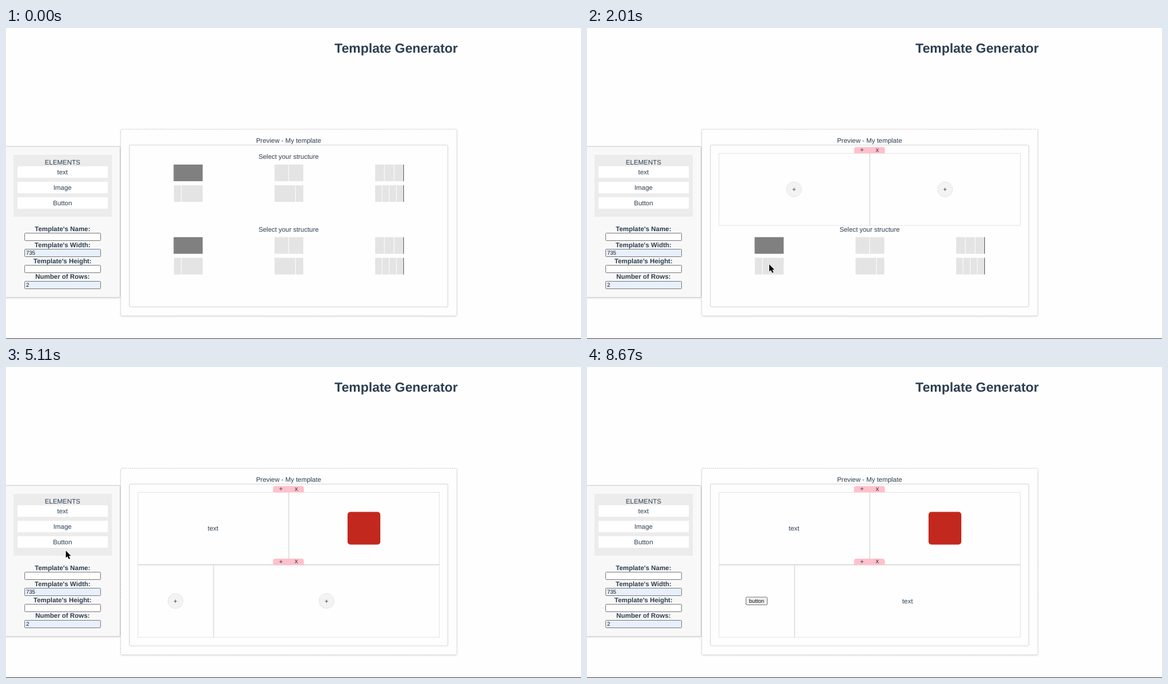
These frames come from a looping animation (1000 px wide and 542 px high, 8.77 s). An HTML page:

```html
<!DOCTYPE html>
<html lang="en">
<head>
<meta charset="utf-8">
<title>Template Generator</title>
<style>
  html, body { margin: 0; width: 100%; height: 100%; overflow: hidden; background: #fefefe; }
  svg { display: block; width: 1000px; height: 542px; overflow: hidden; }
  text {
    font: 11.43px "Liberation Sans", Arial, sans-serif;
    fill: #2c3e50; text-anchor: middle; text-rendering: geometricPrecision;
  }
  .title { font-size: 22.86px; font-weight: bold; }
  .label { font-weight: bold; }
  .control { font-size: 9.52px; fill: #111; }
  .left { text-anchor: start; }
  .input { fill: #fff; stroke: #767676; }
  .filled { fill: #e8f0fe; }
  .white { fill: #fff; }
  .panel { stroke: #ccc; filter: drop-shadow(0 1px 1.5px #0002); }
  .cell { fill: #fefefe; stroke: #e3e3e3; }
  .divider { stroke: #dcdcdc; stroke-width: 1.6; }
  .block { fill: #e4e4e4; }
  .edge { fill: #555; }

  /* Parts that appear at a set moment of the loop */
  .step { animation: 8.77s step-end infinite; }
  .row1 { animation-name: row1; }
  .row2 { animation-name: row2; }
  .text1 { animation-name: text1; }
  .image { animation-name: image; }
  .button { animation-name: button; }
  .text2 { animation-name: text2; }
  @keyframes row1 { 0% { visibility: hidden } 11.52%, 100% { visibility: visible } }
  @keyframes row2 { 0% { visibility: hidden } 24.52%, 100% { visibility: visible } }
  @keyframes text1 { 0% { visibility: hidden } 35.8%, 100% { visibility: visible } }
  @keyframes image { 0% { visibility: hidden } 52.68%, 100% { visibility: visible } }
  @keyframes button { 0% { visibility: hidden } 69.1%, 100% { visibility: visible } }
  @keyframes text2 { 0% { visibility: hidden } 87%, 100% { visibility: visible } }

  .cursor { animation: travel 8.77s linear infinite; }
  @keyframes travel {
    0%, 2.16% { transform: translate(440px, 550px) }
    /* pick both row structures */
    9.92%, 14.02% { transform: translate(484px, 250px) }
    14.6%, 15.5% { transform: translate(480px, 252px) }
    21.9%, 25% { transform: translate(317px, 412px) }
    /* drag text */
    28.4%, 29.7% { transform: translate(127px, 272px) }
    31%, 32% { transform: translate(112px, 249px) }
    33.87%, 35.9% { transform: translate(360px, 281px) }
    41.5%, 42.8% { transform: translate(131px, 253px) }
    /* drag image */
    44.13%, 46.4% { transform: translate(116px, 277px) }
    47.55%, 52.7% { transform: translate(622px, 281px) }
    58.2%, 59.3% { transform: translate(104px, 320px) }
    /* drag button */
    61.35%, 62.7% { transform: translate(112px, 304px) }
    65.91%, 69.1% { transform: translate(295px, 407px) }
    71.4%, 72.15% { transform: translate(146px, 314px) }
    72.3%, 73.88% { transform: translate(140px, 306px) }
    /* drag second text */
    78.68%, 80.26% { transform: translate(110px, 250px) }
    81.41%, 88% { transform: translate(557px, 407px) }
    96.58%, 100% { transform: translate(520px, 550px) }
  }
</style>
</head>
<body>
<svg viewBox="0 0 1000 542">
  <defs>
    <g id="picker">
      <text x="491.5" y="228.3">Select your structure</text>
      <path fill="#808080" d="M291.5 238h50.5v29h-50.5z"/>
      <path class="block" d="M467 238h24v29h-24zM492 238h25v29h-25z
        M642 238h15.5v29h-15.5zM658.5 238h16v29h-16zM675.5 238h15.5v29h-15.5z
        M292 274h12.5v29h-12.5zM305.5 274h36.5v29h-36.5z
        M467 274h36v29h-36zM504 274h13v29h-13z
        M642 274h11.5v29h-11.5zM654.5 274h11.5v29h-11.5zM667 274h11.5v29h-11.5zM679.5 274h11.5v29h-11.5z"/>
      <path class="edge" d="M691 238h1v29h-1zM691 274h1v29h-1z"/>
    </g>
    <g id="add">
      <circle r="13" fill="#f3f3f3" stroke="#ccc" stroke-width=".8" stroke-dasharray="1.4 1"/>
      <text y="3.8">+</text>
    </g>
    <g id="tab">
      <path fill="#ffc0cb" d="M464.5 218.5v-7q0-4 4-4h45.5q4 0 4 4v7z"/>
      <text x="478" y="216.3">+</text>
      <text x="504.8" y="216">x</text>
    </g>
    <g id="word">
      <circle r="14.5" fill="#fefefe"/>
      <text y="3.8">text</text>
    </g>
  </defs>

  <rect width="1000" height="542" fill="#fefefe"/>
  <text class="title" x="678.5" y="43.3">Template Generator</text>

  <rect class="panel" x="-2.5" y="206.5" width="201" height="263" rx="2" fill="#f8f8f8"/>
  <path fill="#ececec" d="M13 221h171v108h-171z"/>
  <path class="white" d="M20 241h157v20h-157zM20 268h157v20h-157zM20 295h157v20h-157z"/>
  <text x="98.3" y="238.3">ELEMENTS</text>
  <text x="98.3" y="254.7">text</text>
  <text x="98.3" y="282">Image</text>
  <text x="98.3" y="309">Button</text>

  <text class="label" x="98.3" y="354">Template's Name:</text>
  <text class="label" x="98.3" y="381.7">Template's Width:</text>
  <text class="label" x="98.3" y="409.5">Template's Height:</text>
  <text class="label" x="98.3" y="437.3">Number of Rows:</text>
  <rect class="input" x="32.5" y="357.5" width="132" height="13" rx="1"/>
  <rect class="input filled" x="32.5" y="385.5" width="132" height="13" rx="1"/>
  <rect class="input" x="32.5" y="413.5" width="132" height="13" rx="1"/>
  <rect class="input filled" x="32.5" y="441.5" width="132" height="13" rx="1"/>
  <text class="control left" x="35" y="395.4">735</text>
  <text class="control left" x="35" y="451.2">2</text>

  <rect class="panel" x="199.5" y="176.5" width="584.5" height="325" rx="2" fill="#fefefe" stroke-dasharray="2 1.5"/>
  <rect x="214.5" y="204" width="554" height="282" rx="2" fill="none" stroke="#d2d2d2"/>
  <text x="491.5" y="200.3">Preview - My template</text>
  <use href="#picker"/>
  <use href="#picker" y="126.4"/>

  <g class="step row1">
    <rect class="cell" x="229.5" y="218.5" width="524" height="125.5"/>
    <path class="divider" d="M491.7 218.5V344"/>
    <use href="#tab"/>
    <use href="#add" x="360" y="281.2"/>
    <use href="#add" x="622.7" y="281.2"/>
  </g>
  <g class="step row2">
    <rect class="cell" x="229.5" y="345" width="524" height="126"/>
    <path class="divider" d="M229 344.7H754M361 345V471"/>
    <use href="#tab" y="126.4"/>
    <use href="#add" x="294.7" y="407.7"/>
    <use href="#add" x="557.4" y="407.7"/>
  </g>

  <use class="step text1" href="#word" x="360" y="281"/>
  <rect class="step image" x="594" y="252.5" width="57" height="57" rx="5" fill="#c3281e"/>
  <g class="step button">
    <circle cx="294.7" cy="407.7" r="14.5" fill="#fefefe"/>
    <rect x="276.5" y="401" width="37" height="13.5" rx="1.5" fill="#efefef" stroke="#767676"/>
    <text class="control" x="294.9" y="411">button</text>
  </g>
  <use class="step text2" href="#word" x="557.4" y="407.7"/>

  <path fill="#403c42" d="M0 541h1000v1H0z"/>
  <path class="cursor" d="M0 0V12.5L2.8 10L5.2 14.8L7.4 13.7L5.2 9.2H9Z"
    stroke="#fff" stroke-width="1.2" paint-order="stroke"/>
</svg>
</body>
</html>
```
